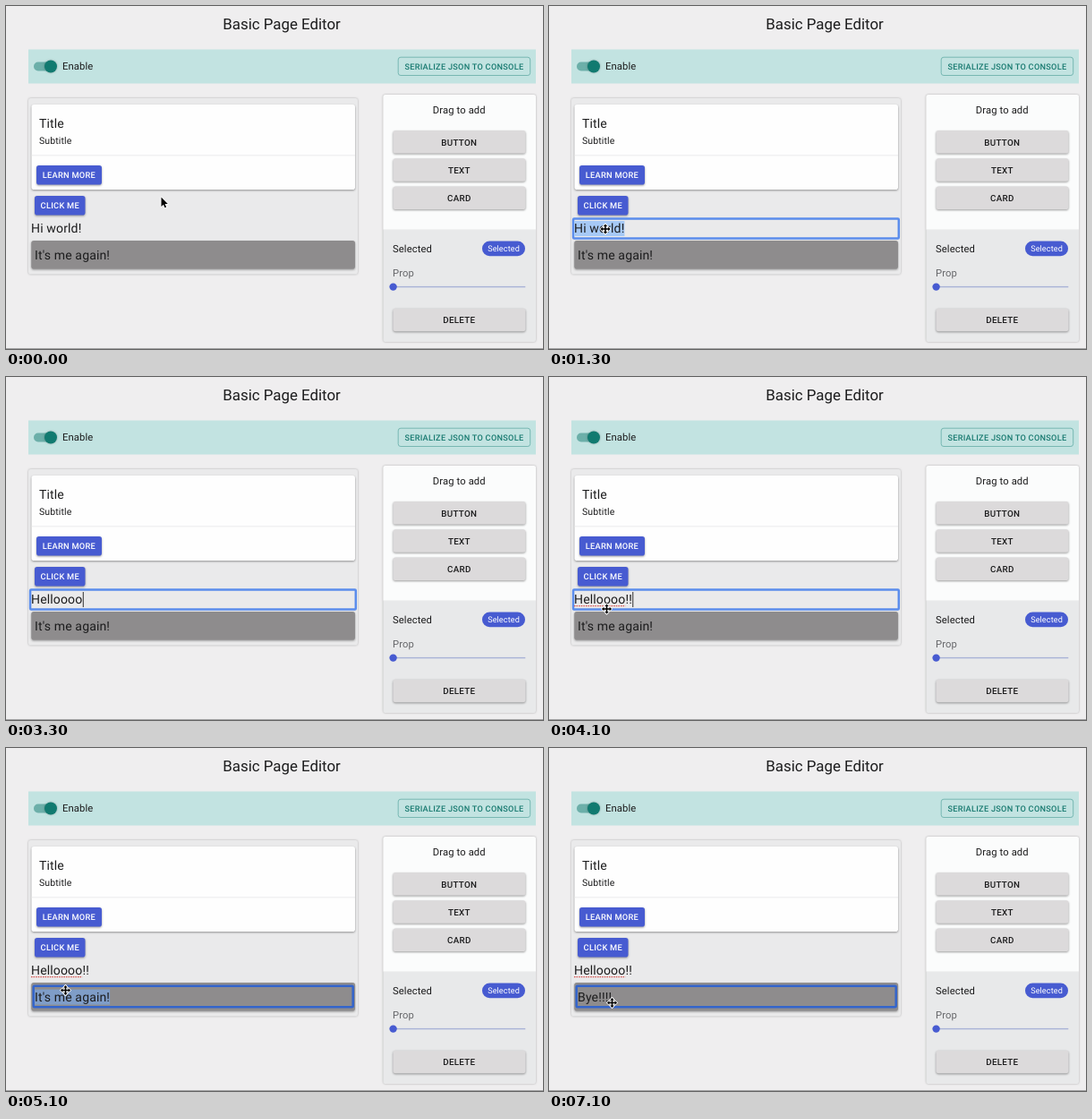
These frames come from a looping animation (600x383 px, 7200 ms). An HTML page:

```html
<!DOCTYPE html>
<html lang="en">
<head>
<meta charset="utf-8">
<title>Basic Page Editor</title>
<style>
  html, body { margin: 0; width: 100%; height: 100%; overflow: hidden; background: #efeeef; }
  svg { display: block; width: 600px; height: 383px; }
  text { font: 11.25px Roboto, sans-serif; letter-spacing: .00938em; fill: #1c1c1d; text-rendering: geometricPrecision; white-space: pre; }
  .mid { text-anchor: middle; }
  .h5 { font-size: 16.88px; letter-spacing: 0; }
  .big { font-size: 14.06px; }
  .sub { font-size: 10.55px; }
  .btn { font-size: 9.84px; font-weight: 500; letter-spacing: .02857em; }
  .small { font-size: 9.3px; fill: #fff; }
  .teal { font-size: 9.2px; fill: #187a70; }
  .chip { font-size: 9.14px; fill: #fff; }
  .soft { fill: #66676a; }
  .blue { fill: #475bd1; }
  .grey { fill: #dcdadb; }
  .paper { filter: drop-shadow(0 .8px .9px rgba(0, 0, 0, .28)); }
  .raised { filter: drop-shadow(0 1.2px 1px rgba(0, 0, 0, .38)); }
  .ring { fill: none; stroke-width: 2.5; }
  .cursor path { stroke: #fff; stroke-width: 1.6; paint-order: stroke; stroke-linejoin: round; fill: #000; }
</style>
</head>
<body>
<svg viewBox="0 0 600 383">
  <rect width="600" height="383" fill="#efeeef"/>
  <rect y="382" width="600" height="1" fill="#a2a2a3"/>
  <text class="h5 mid" x="308" y="25.7">Basic Page Editor</text>

  <rect x="25" y="48.5" width="567" height="38" fill="#c2e3e1"/>
  <rect x="31" y="62.6" width="24" height="9.8" rx="4.9" fill="#6cafa9"/>
  <circle class="paper" cx="50" cy="67.5" r="7" fill="#117a70"/>
  <text x="63" y="71.3">Enable</text>
  <rect x="438.2" y="57.2" width="147.5" height="20.3" rx="2.8" fill="none" stroke="#6fb3ad" stroke-width=".9"/>
  <text class="btn teal mid" x="511.9" y="70.7">SERIALIZE JSON TO CONSOLE</text>

  <rect class="paper" x="25" y="103" width="368" height="196.5" rx="2.8" fill="#eaeaeb"/>
  <rect class="raised" x="28.5" y="110" width="361.5" height="95" rx="2.8" fill="#fefefe"/>
  <rect x="28.5" y="166.5" width="361.5" height=".8" fill="#e6e6e7"/>
  <text class="big" x="37" y="135.7">Title</text>
  <text class="sub" x="37" y="154">Subtitle</text>
  <rect class="blue raised" x="34" y="178" width="73" height="21.5" rx="2.8"/>
  <text class="btn small mid" x="70.4" y="192">LEARN MORE</text>
  <rect class="blue raised" x="32" y="212" width="56.5" height="21.5" rx="2.8"/>
  <text class="btn small mid" x="60.3" y="226.1">CLICK ME</text>
  <rect class="raised" x="28.3" y="262" width="361.7" height="31.5" rx="2.8" fill="#8e8c8d"/>

  <g id="fields"></g>

  <g class="paper">
    <rect x="421.5" y="99" width="170.5" height="276" rx="2.8" fill="#e8e9ea"/>
    <path d="M421.5 249.5V101.8a2.8 2.8 0 0 1 2.8-2.8H589.2a2.8 2.8 0 0 1 2.8 2.8V249.5z" fill="#fbfcfc"/>
  </g>
  <text class="mid" x="506.3" y="120">Drag to add</text>
  <g id="buttons"></g>
  <text x="432" y="275">Selected</text>
  <rect class="blue" x="532" y="262.5" width="48" height="16.8" rx="8.4"/>
  <text class="chip mid" x="556" y="274.1">Selected</text>
  <text class="soft" x="432" y="301.6">Prop</text>
  <rect x="432.5" y="312.9" width="147.8" height="1.4" fill="#a9b2d6"/>
  <circle class="blue" cx="432.6" cy="313.6" r="4.2"/>

  <g id="cursor" class="cursor">
    <path id="arrow" d="M0 0V10.4L2.4 8.2L4 11.8L5.6 11.1L4 7.6H7.3z"/>
    <path id="move" d="M0-5.6L2.2-3.1H.8V-.8H3.1V-2.2L5.6 0L3.1 2.2V.8H.8V3.1H2.2L0 5.6L-2.2 3.1H-.8V.8H-3.1V2.2L-5.6 0L-3.1-2.2V-.8H-.8V-3.1H-2.2z"/>
  </g>
</svg>
<script>
const LOOP = 7200, STEP = 100;
const $ = id => document.getElementById(id);

function add(parent, tag, attrs, label) {
  const el = document.createElementNS('http://www.w3.org/2000/svg', tag);
  for (const k in attrs) el.setAttribute(k, attrs[k]);
  if (label) el.textContent = label;
  return parent.appendChild(el);
}
const show = (el, on) => el.setAttribute('visibility', on ? 'visible' : 'hidden');

[['BUTTON', 139], ['TEXT', 170.2], ['CARD', 201.4], ['DELETE', 337.7]].forEach(([label, y]) => {
  add($('buttons'), 'rect', { class: 'grey raised', x: 432.5, y, width: 148, height: 25.6, rx: 2.8 });
  add($('buttons'), 'text', { class: 'btn mid', x: 506.3, y: y + 16.5 }, label);
});

// keys: [time, text]; focus: [from, to]; select: time the text gets selected
const fields = [
  { x: 28, y: 253, text: 'Hi world!', focus: [1000, 4500], select: 1200, sel: '#a6c9f6', misspelt: 8,
    ring: { x: 27.1, y: 237.5, width: 363.7, height: 22, rx: 1, stroke: '#5b8dec' },
    keys: [[2100, 'H'], [2300, 'He'], [2400, 'Hel'], [2600, 'Hell'], [2800, 'Hello'], [2900, 'Helloo'],
           [3100, 'Hellooo'], [3200, 'Helloooo'], [3500, 'Helloooo!'], [3700, 'Helloooo!!']] },
  { x: 32, y: 282.6, text: "It's me again!", focus: [4500, LOOP], select: 4700, sel: '#7f9dc8',
    ring: { x: 30.7, y: 265.7, width: 357, height: 23.6, rx: 1, stroke: '#3465cb' },
    keys: [[5400, 'B'], [5500, 'By'], [5700, 'Bye'], [6100, 'Bye!'], [6300, 'Bye!!'], [6400, 'Bye!!!'], [6600, 'Bye!!!!']] }
];

for (const f of fields) {
  const g = $('fields'), top = f.y - 13;
  f.ringEl = add(g, 'rect', { class: 'ring', ...f.ring });
  f.selEl = add(g, 'rect', { x: f.x, y: top, height: 17, fill: f.sel });
  f.textEl = add(g, 'text', { class: 'big', x: f.x, y: f.y });
  f.caretEl = add(g, 'rect', { y: top, width: .9, height: 17, fill: '#1c1c1d' });
  f.wavyEl = add(g, 'path', { stroke: '#d8504c', 'stroke-width': 1.4, 'stroke-dasharray': '1.5 1.1' });
}

function drawField(f, t) {
  const key = f.keys.filter(k => k[0] <= t).pop();
  const text = key ? key[1] : f.text;
  const focused = t >= f.focus[0] && t < f.focus[1];
  const selected = focused && !key && t >= f.select;
  const since = t - (key ? key[0] : f.focus[0]);
  f.textEl.textContent = text;
  const width = f.textEl.getComputedTextLength();
  show(f.ringEl, focused);
  show(f.selEl, selected);
  f.selEl.setAttribute('width', width);
  show(f.caretEl, focused && !selected && since % 1000 < 500);
  f.caretEl.setAttribute('x', f.x + (key ? width : width * .6) + .4);
  const wrong = key && f.misspelt && text.length > f.misspelt;
  show(f.wavyEl, wrong);
  if (wrong) f.wavyEl.setAttribute('d', `M${f.x} ${f.y + 2.6}h${f.textEl.getSubStringLength(0, f.misspelt)}`);
}

// time, x, y of the pointer; it hides while typing
const path = [[0, 173.5, 213.5], [200, 160, 217], [500, 90, 237], [800, 64, 248], [1000, 63, 249], [3900, 63, 249],
              [4100, 64.5, 259], [4400, 66.5, 270.5], [6800, 66.5, 270.5], [7100, 70.5, 284.5]];
const hidden = [[2100, 3900], [5400, 6900]];

function drawCursor(t) {
  const i = Math.max(1, path.findIndex(p => p[0] >= t));
  const a = path[i - 1], b = path[i], k = (t - a[0]) / (b[0] - a[0]);
  const x = a[1] + (b[1] - a[1]) * k, y = a[2] + (b[2] - a[2]) * k;
  const seen = !hidden.some(h => t >= h[0] && t < h[1]);
  $('cursor').setAttribute('transform', `translate(${x} ${y})`);
  show($('arrow'), seen && y < 238);
  show($('move'), seen && y >= 238);
}

function render(now) {
  const t = Math.floor(now % LOOP / STEP) * STEP;
  fields.forEach(f => drawField(f, t));
  drawCursor(t);
}

let start;
function tick(now) {
  start ??= now;
  render(Math.max(0, now - start));
  requestAnimationFrame(tick);
}
render(0);
requestAnimationFrame(tick);
</script>
</body>
</html>
```
